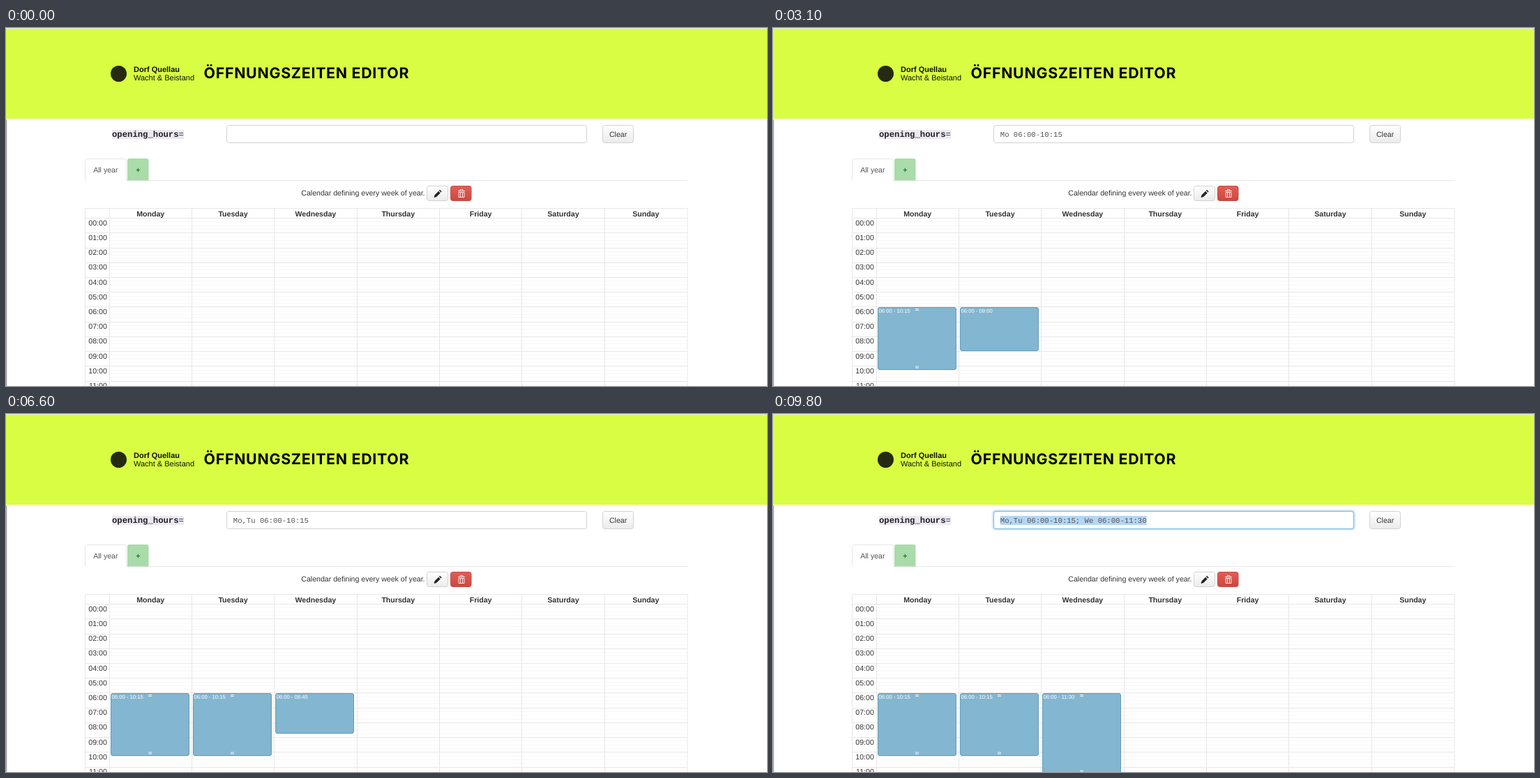
An HTML page for the animation above (9.9 s loop, 1091x513 px).

```html
<!DOCTYPE html>
<html lang="de">
<head>
<meta charset="utf-8">
<title>Öffnungszeiten Editor</title>
<style>
  html, body { margin: 0; width: 100%; height: 100%; overflow: hidden; background: #fff; }
  svg { display: block; font: 10.6px "Liberation Sans", Arial, sans-serif; fill: #333; text-rendering: geometricPrecision; }
  text { white-space: pre; }
  .mono { font-family: "Liberation Mono", monospace; }
  .bold { font-weight: 700; }
  .title { font: 700 21.3px Inter, sans-serif; letter-spacing: .035em; fill: #000; }
  .mid { text-anchor: middle; }
  .end { text-anchor: end; }
  .line { stroke: #e7e7e7; fill: none; }
  .box { fill: #fff; stroke: #d2d2d2; }
</style>
</head>
<body>
<svg width="1091" height="513" viewBox="0 0 1091 513">
  <defs>
    <linearGradient id="grey" x2="0" y2="1"><stop stop-color="#fff"/><stop offset="1" stop-color="#ebebeb"/></linearGradient>
    <linearGradient id="red" x2="0" y2="1"><stop stop-color="#e25d55"/><stop offset="1" stop-color="#cd473f"/></linearGradient>
    <filter id="blur"><feGaussianBlur stdDeviation="1.6"/></filter>
  </defs>

  <rect width="1091" height="2" fill="#e4e6dc"/>
  <rect y="1.5" width="1091" height="128.5" fill="#d9fd42"/>
  <rect y="131" width="1.3" height="382" fill="#a2a2a2"/>
  <circle cx="161.5" cy="65.5" r="11.5" fill="#262a12"/>
  <g font-size="11" fill="#111">
    <text class="bold" x="183" y="63">Dorf Quellau</text>
    <text x="183" y="75.3">Wacht &amp; Beistand</text>
  </g>
  <text class="title" x="283.5" y="72">ÖFFNUNGSZEITEN EDITOR</text>

  <rect x="152" y="146" width="103" height="13" fill="#ece9f3"/>
  <text class="mono" x="152" y="156" font-size="12.25"><tspan class="bold" fill="#222">opening_hours</tspan>=</text>
  <rect class="box" x="855.5" y="139.5" width="44" height="25" rx="3" style="fill:url(#grey)"/>
  <text class="mid" x="877.6" y="156">Clear</text>

  <path class="line" d="M172.5 218.5H977M113.5 218.5V190.5q0-3 3-3H169.5q3 0 3 3V218.5"/>
  <text x="125.2" y="206.8" fill="#555">All year</text>
  <path d="M174 218.5V190q0-3 3-3H201.5q3 0 3 3V218.5z" fill="#aadbaa"/>
  <text class="mid bold" x="189.3" y="207.3" style="fill:#168016">+</text>

  <text x="423.3" y="239.8">Calendar defining every week of year.</text>
  <rect class="box" x="603.5" y="226.5" width="30" height="21" rx="3" style="fill:url(#grey)"/>
  <path d="M613.5 243l1-3.6 5.6-5.6 2.6 2.6-5.6 5.6zM620.9 233l1.2-1.2 2.6 2.6-1.2 1.2z" fill="#222"/>
  <rect x="637.5" y="226.5" width="29.5" height="21" rx="3" fill="url(#red)" stroke="#bf5049"/>
  <path d="M648 233.5h10M651 233v-1.5h4v1.5M649 235.5v7h8v-7zM651.5 236v6M654.5 236v6" fill="none" stroke="#fff" stroke-opacity=".85"/>

  <g id="grid"></g>
  <g id="events"></g>
  <g id="field"></g>
</svg>

<script>
const LOOP = 9900, TICK = 100;
const LEFT = 113.5, AXIS = 148, RIGHT = 977, COLUMN = 118.35;
const HEAD = 258.5, TOP = 272.6, HOUR = 21.22;
const DAYS = ['Monday', 'Tuesday', 'Wednesday', 'Thursday', 'Friday', 'Saturday', 'Sunday'];

// Drag keys are [time, length in quarter hours]; handles appear once released.
const SLOTS = [
  { drag: [[200, 1], [700, 17]], released: 1300 },
  { drag: [[2500, 1], [3400, 17]], released: 4200 },
  { drag: [[6300, 1], [6900, 20], [7300, 21], [7700, 22]], released: 8200 },
];
const VALUES = [
  [1300, 'Mo 06:00-10:15'],
  [4200, 'Mo,Tu 06:00-10:15'],
  [8200, 'Mo,Tu 06:00-10:15; We 06:00-11:30'],
];
const FOCUS = 8900, SELECT_START = 9100, SELECT_END = 9600;
const CHAR = 6.36, TEXT_X = 325.8;

const byId = id => document.getElementById(id);
const clamp = v => Math.max(0, Math.min(1, v));
const progress = (t, a, b) => clamp((t - a) / (b - a));
const two = n => String(n).padStart(2, '0');
const crisp = v => Math.floor(v) + 0.5;

function keyed(keys, t) {
  let value = keys[0][1];
  for (let i = 1; i < keys.length; i++) {
    const [a, from] = keys[i - 1], [b, to] = keys[i];
    if (t >= a) value = from + (to - from) * progress(t, a, b);
  }
  return value;
}

function drawGrid() {
  let out = `<path class="line" d="M${LEFT} 513V${HEAD}H${RIGHT}V513"/>`;
  for (let q = 0; q < 46; q++) {
    const y = crisp(TOP + q * HOUR / 4);
    out += q % 4
      ? `<path class="line" style="stroke:#efefef" stroke-dasharray="1 1" d="M${AXIS} ${y}H${RIGHT}"/>`
      : `<path class="line" d="M${LEFT} ${y}H${RIGHT}"/>
         <text class="end" x="144.8" y="${TOP + q * HOUR / 4 + 10.1}">${two(q / 4)}:00</text>`;
  }
  DAYS.forEach((day, i) => {
    const x = AXIS + i * COLUMN;
    out += `<path class="line" d="M${crisp(x)} ${HEAD}V513"/>
      <text class="mid bold" x="${x + COLUMN / 2}" y="269.6">${day}</text>`;
  });
  return out;
}

function handle(x, y) {
  return `<path d="M${x - 2.5} ${y - 1}h5m-5 2h5" stroke="#fff" stroke-opacity=".85"/>`;
}

function drawEvent({ drag, released }, column, t) {
  if (t < drag[0][0]) return '';
  const quarters = Math.round(keyed(drag, t));
  const end = 24 + quarters;
  const x = crisp(AXIS + column * COLUMN + 2), y = 400.5, width = 112;
  const bottom = crisp(TOP + end * HOUR / 4 - 0.9);
  const label = `06:00 - ${two(Math.floor(end / 4))}:${two(end % 4 * 15)}`;
  return `<rect x="${x}" y="${y}" width="${width}" height="${bottom - y}" rx="2.5" fill="#83b6d0" stroke="#609dbd"/>
    <text x="${x + 1}" y="408.2" font-size="7.7" fill="#fff">${label}</text>` +
    (t < released ? '' : handle(x + width / 2, 403.5) + handle(x + width / 2, bottom - 3.5));
}

function drawField(t) {
  const value = VALUES.reduce((last, [at, text]) => t >= at ? text : last, '');
  const frame = 'x="316.5" y="139.5" width="516" height="25" rx="3"';
  const focus = progress(t, FOCUS, FOCUS + 200);
  const end = TEXT_X + value.length * CHAR;
  const picked = Math.round(value.length * progress(t, SELECT_START, SELECT_END)) * CHAR;
  let out = '';
  if (focus) out += `<rect ${frame} fill="none" stroke="#52a8ec" stroke-width="3" opacity="${focus * 0.5}" filter="url(#blur)"/>`;
  out += `<rect class="box" ${frame}/>`;
  if (focus) out += `<rect ${frame} fill="none" stroke="#75b9e6" opacity="${focus}"/>`;
  if (picked) out += `<rect x="${end - picked}" y="146" width="${picked}" height="13" fill="#b5d6f3"/>`;
  else if (focus) out += `<path d="M${crisp(end)} 146v13" stroke="#555"/>`;
  return out + `<text class="mono" x="${TEXT_X}" y="156.3" font-size="10.6" fill="#555">${value}</text>`;
}

function render(now) {
  const t = Math.floor(now % LOOP / TICK) * TICK;
  byId('events').innerHTML = SLOTS.map((slot, i) => drawEvent(slot, i, t)).join('');
  byId('field').innerHTML = drawField(t);
}

byId('grid').innerHTML = drawGrid();
const start = performance.now();
function loop() {
  render(performance.now() - start);
  requestAnimationFrame(loop);
}
loop();
</script>
</body>
</html>
```
